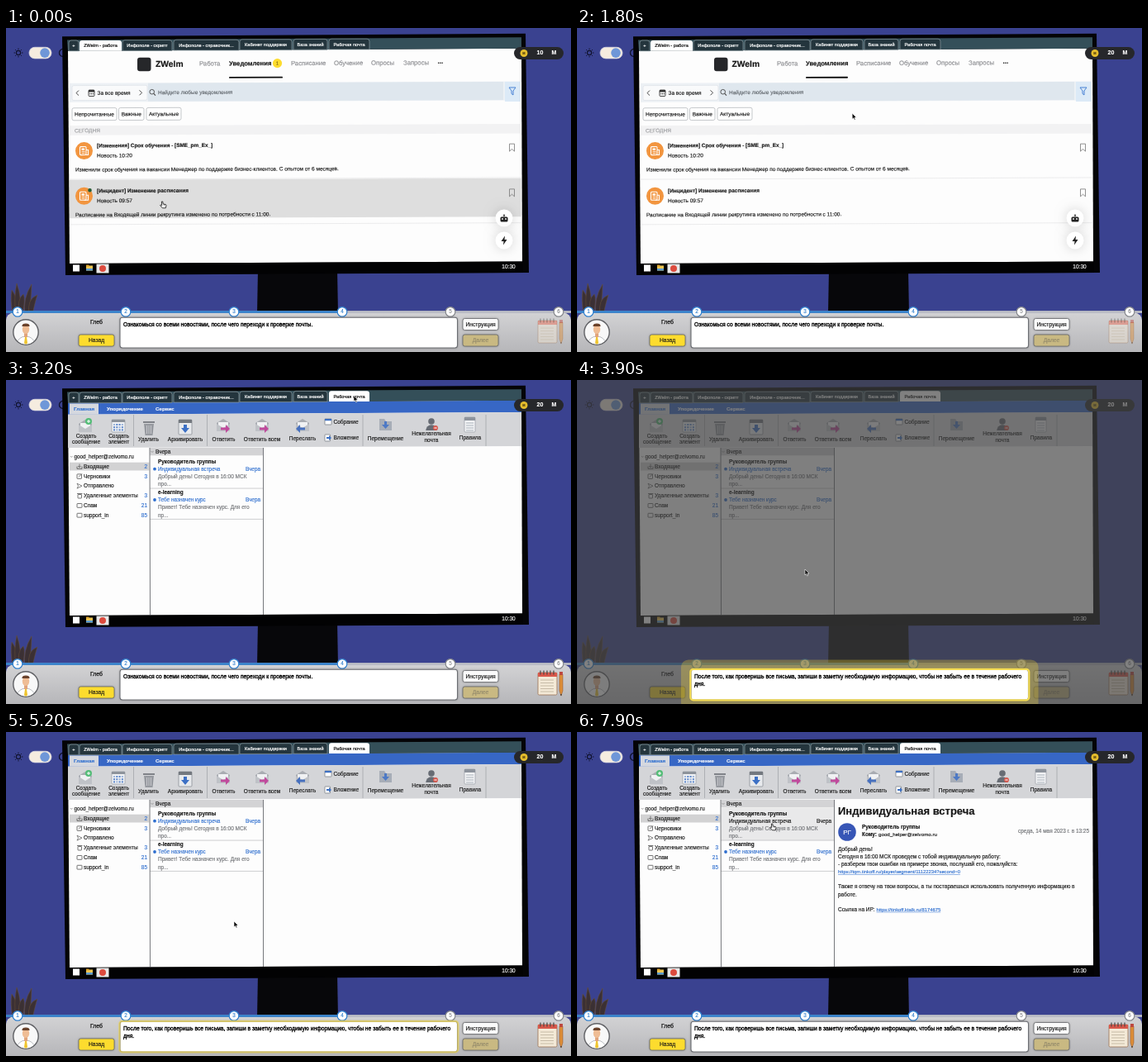
Write an HTML page with a canvas that moves like this. It is 684 px wide and 392 px high and loops after 8000 ms.

```html
<!DOCTYPE html>
<html lang="ru">
<head>
<meta charset="utf-8">
<style>
html, body { margin: 0; width: 100%; height: 100%; overflow: hidden; background: #3a4290; }
canvas { display: block; width: 684px; height: 392px; }
</style>
</head>
<body>
<canvas id="stage"></canvas>
<script>
const W = 684, H = 392, LOOP = 8000;
const canvas = document.getElementById('stage');
const ratio = window.devicePixelRatio || 1;
canvas.width = W * ratio;
canvas.height = H * ratio;
const c = canvas.getContext('2d');

const SANS = '"Liberation Sans", Arial, sans-serif';
const INK = '#161616', BLUE = '#2f6fcf', YELLOW = '#fddc2e', MUTED = '#8b8c90';
const EMAIL = 'good_helper@zelvomo.ru';
const PAGE = [[75, 27.8], [624, 24.8], [625, 282.5], [77, 285]];

const clamp = v => Math.max(0, Math.min(1, v));
const span = (t, a, b) => clamp((t - a) / (b - a));
const ease = p => p * p * (3 - 2 * p);

function rect(x, y, w, h, fill) { c.fillStyle = fill; c.fillRect(x, y, w, h); }
function box(x, y, w, h, r, fill, stroke, width = 1) {
  c.beginPath(); c.roundRect(x, y, w, h, r); paint(fill, stroke, width);
}
function disc(x, y, r, fill, stroke, width = 1) {
  c.beginPath(); c.arc(x, y, r, 0, 7); paint(fill, stroke, width);
}
function poly(points, fill, stroke, width = 1, closed = true) {
  c.beginPath();
  points.forEach(([x, y]) => c.lineTo(x, y));
  if (closed) c.closePath();
  paint(fill, stroke, width);
}
function line(x1, y1, x2, y2, color, width = 1) { poly([[x1, y1], [x2, y2]], null, color, width, false); }
function paint(fill, stroke, width) {
  if (fill) { c.fillStyle = fill; c.fill(); }
  if (stroke) { c.strokeStyle = stroke; c.lineWidth = width; c.stroke(); }
}
// heft thickens the letters a little without widening the line
function text(s, x, y, { size = 6.5, color = INK, weight = 400, align = 'left', font = SANS, heft = .15 } = {}) {
  c.font = `${weight} ${size}px ${font}`;
  c.fillStyle = c.strokeStyle = color;
  c.textAlign = align;
  c.textBaseline = 'middle';
  c.fillText(s, x, y + .5);
  if (heft) {
    c.lineWidth = heft;
    c.lineJoin = 'round';
    c.strokeText(s, x, y + .5);
    c.lineJoin = 'miter';
  }
}
const bold = (s, x, y, o = {}) => text(s, x, y, { weight: 700, ...o });
const mid = (s, x, y, o = {}) => text(s, x, y, { align: 'center', ...o });
function at(x, y, draw) { c.save(); c.translate(x, y); draw(); c.restore(); }
function alpha(a, draw) { if (a > 0) { c.save(); c.globalAlpha *= a; draw(); c.restore(); } }
function shadow(color, blur, draw) {
  c.save(); c.shadowColor = color; c.shadowBlur = blur * ratio; draw(); c.restore();
}

// Cursor: stops and quadratic moves between them
const moves = [
  { a: 450, b: 1000, from: [190, 210], via: [170, 170], to: [129, 143] },
  { a: 1480, b: 2120, from: [129, 143], via: [390, 126], to: [421, 19] },
  { a: 3250, b: 3750, from: [421, 19], via: [370, 130], to: [276, 229] },
  { a: 6750, b: 7150, from: [276, 229], via: [262, 160], to: [237, 111] }
];
function pointer(t) {
  const m = moves.filter(v => t >= v.a).pop() || moves[0];
  const p = ease(span(t, m.a, m.b)), q = 1 - p;
  return [0, 1].map(i => q * q * m.from[i] + 2 * q * p * m.via[i] + p * p * m.to[i]);
}

function drawCursor(x, y, hand) {
  at(x, y, () => {
    if (!hand) {
      poly([[0, 0], [0, 7], [1.6, 5.6], [2.7, 8], [3.9, 7.5], [2.8, 5.1], [5, 5]], '#000', '#fff', .6);
      return;
    }
    poly([[-1.6, 0], [-.2, 0], [.2, 3], [3.4, 3.5], [4, 4.6], [3.3, 7.8], [-.6, 7.8], [-3.4, 4.6], [-2.8, 3.9], [-1.3, 4.8]],
      '#fff', '#111', .8);
    line(1.2, 3.3, 1.2, 4.8, '#111', .4);
    line(2.4, 3.5, 2.4, 4.8, '#111', .4);
  });
}

function drawRoom() {
  rect(0, 0, W, H, '#3a4290');
  // plant blades: foot, tip
  for (const [foot, x, y] of [[10, 7, 317], [14, 13, 309], [18, 21, 322], [25, 31, 310], [30, 38, 323]]) {
    c.beginPath();
    c.moveTo(foot - 2, 346);
    c.quadraticCurveTo(foot - 5, 328, x, y);
    c.quadraticCurveTo(foot + 6, 328, foot + 2, 346);
    paint('#3b3034', '#6b5238', .5);
  }
  // theme switch
  disc(15, 30, 2.6, null, '#10122c', 1.1);
  for (let i = 0; i < 8; i++) {
    const u = Math.cos(i * Math.PI / 4), v = Math.sin(i * Math.PI / 4);
    line(15 + 4 * u, 30 + 4 * v, 15 + 5.4 * u, 30 + 5.4 * v, '#10122c', 1);
  }
  box(28, 23.3, 27, 13.6, 6.8, '#f5ecdf', '#d9d9e4', .8);
  disc(47, 30.1, 5.8, '#6f97d8');
  c.beginPath(); c.arc(69, 30, 4.5, .9, 5.3); paint(null, '#10122c', 1.3);

  poly([[305, 292], [401, 292], [402, 346], [304, 346]], '#07070a');
  poly([[68, 10.3], [629, 6.8], [633, 296], [72, 299]], '#040406');
}

function drawCoins(coins) {
  box(615, 23, 60, 15, 7.5, '#26272b');
  disc(627, 30.5, 4.5, '#e5bd2c');
  mid('м', 627, 30, { size: 4.5, weight: 700, color: '#574312' });
  mid(coins, 646.5, 30, { size: 7, weight: 700, color: '#fff' });
  mid('М', 663.5, 30, { size: 7, weight: 700, color: '#fff' });
}

const tabs = [
  ['+', 76, 88], ['ZWelm - работа', 89, 140], ['Инфополе - скрипт', 141, 201],
  ['Инфополе - справочник...', 203, 282], ['Кабинет поддержки', 283, 346],
  ['База знаний', 348, 389], ['Рабочая почта', 391, 440]
];
function drawBrowser(active, hovered) {
  poly([[74, 14.5], [624, 11.2], PAGE[1], PAGE[0]], '#344f59');
  tabs.forEach(([label, a, b], i) => {
    const y = 15 - (a - 76) * .0058, on = i === active, hot = i === hovered;
    box(a, y, b - a, 12.8, [3, 3, 0, 0], on ? '#fff' : hot ? '#8b979c' : '#24353d', on ? null : '#8a9a9f', .7);
    mid(label, (a + b) / 2, y + 6.3, { size: 5.6, color: on ? INK : hot ? '#4d5960' : '#fff', heft: .2 });
  });
  poly([PAGE[3], PAGE[2], [626, 296], [77, 298]], '#020203');
  rect(81, 286.5, 8, 8, '#fff');
  rect(97, 287.5, 8, 6, '#efc653');
  rect(97, 286.5, 3.5, 2, '#d69d2b');
  rect(97, 291, 8, 2.5, '#5b9bd0');
  rect(109.5, 285.5, 15, 11, '#e9e9e9');
  disc(117, 291, 4, '#dc4b3e');
  mid('10:30', 608.5, 288.7, { color: '#fff' });
}

function bookmark(x, y) {
  poly([[x - 3, y - 4.5], [x + 3, y - 4.5], [x + 3, y + 4.5], [x, y + 1.8], [x - 3, y + 4.5]], null, '#777', .8);
}
function newsIcon(x, y, unread) {
  disc(x, y, 10.5, '#f2953f');
  box(x - 5, y - 5, 7.5, 10, 1, null, '#fff', 1.1);
  poly([[x + 2.5, y - 1], [x + 5, y - 1], [x + 5, y + 5], [x, y + 5]], null, '#fff', 1.1, false);
  rect(x - 3, y - 3, 3.5, 2.4, '#fff');
  line(x - 3, y + 1, x + 1, y + 1, '#fff', .8);
  line(x - 3, y + 3, x + 1, y + 3, '#fff', .8);
  if (unread) disc(x + 7, y - 7, 2.3, '#245b35');
}
function chevron(x, y, dir) {
  poly([[x - dir * 1.5, y - 3], [x + dir * 1.5, y], [x - dir * 1.5, y + 3]], null, '#333', .9, false);
}

function drawNews(t, hoverRow) {
  poly(PAGE, '#fdfdfd');
  c.save();
  c.transform(1, -.004, 0, 1, 0, .44);
  const unread = t < 500, shift = unread ? 0 : 7;
  box(159 + shift, 36, 16.5, 16.5, 3, '#26272a');
  bold('ZWelm', unread ? 181 : 187.5, 44, { size: 10.3 });
  const nav = [['Работа', 234], ['Расписание', 345], ['Обучение', 397], ['Опросы', 442], ['Запросы', 481]];
  nav.forEach(([s, x], i) => text(s, x + (i || unread ? -shift : 8), 43.5, { size: 7.7, color: MUTED }));
  bold('Уведомления', 270 + shift, 43.5, { size: 7.7 });
  bold('...', 522.5 - shift, 42, { size: 8 });
  if (unread) {
    disc(328.5, 43.5, 5.6, YELLOW);
    mid('1', 328.5, 43.4, { size: 6, color: '#806a12' });
  }
  box(270 + shift, 59.7, unread ? 65 : 51, 1.8, .9, '#111');

  rect(77, 66.5, 546, 23, '#edf1f5');
  box(80, 69.5, 91, 18, 2, '#f9fafb', '#d8dee4', .6);
  rect(172, 67, 430, 22, '#dfe7ee');
  rect(604, 67, 19, 24, '#dceaf7');
  chevron(86.5, 78.5, -1);
  chevron(163, 78.5, 1);
  box(100, 75, 7, 7.5, 1, null, '#333', .9);
  rect(100, 75, 7, 2.4, '#333');
  for (let i = 0; i < 3; i++) rect(101.4 + i * 1.7, 79, 1, 1.2, '#333');
  text('За все время', 110.5, 78.5);
  disc(176.7, 77.5, 2.8, null, '#444', .9);
  line(178.8, 79.7, 181, 82, '#444', 1);
  text('Найдите любые уведомления', 184, 78.2, { color: '#60666c' });
  poly([[609, 74], [617, 74], [614, 78], [614, 83], [612, 81.5], [612, 78]], null, '#3978d0', .9);

  [['Непрочитанные', 80, 54], ['Важные', 136.5, 30.5], ['Актуальные', 170, 42]].forEach(([s, x, w]) => {
    box(x, 96.7, w, 15, 2, '#fff', '#aeb2b7', .7);
    mid(s, x + w / 2, 104.2);
  });
  rect(77, 118, 546, 11.5, '#f2f2f3');
  text('СЕГОДНЯ', 83, 124, { color: '#9a9b9e' });

  const rows = [
    ['[Изменения] Срок обучения - [SME_pm_Ex_]', 'Новость 10:20',
      'Изменили срок обучения на вакансии Менеджер по поддержке бизнес-клиентов. С опытом от 6 месяцев.'],
    ['[Инцидент] Изменение расписания', 'Новость 09:57',
      'Расписание на Входящей линии рекрутинга изменено по потребности с 11:00.']
  ];
  rows.forEach(([title, when, body], i) => {
    const y = 130 + i * 54.7;
    if (hoverRow === i) rect(77, y - 1, 546.5, 46.5, '#dedede');
    newsIcon(94.5, y + 18.5, unread && i === 1);
    bold(title, 110, y + 12.2, { size: 6.4 });
    text(when, 110, y + 24.2);
    text(body, 84, y + 41.2);
    bookmark(612.5, y + 16.7);
    line(77, y + 53, 623.5, y + 53, '#e4e4e6', .7);
  });
  c.restore();

  for (const y of [230, 257]) shadow('rgba(0,0,0,.16)', 14, () => disc(603, y, 10.5, '#fff'));
  box(598.5, 228.5, 9, 6, 1.5, '#222');
  line(603, 228, 603, 225.5, '#222', 1.4);
  disc(601, 231, .9, '#fff');
  disc(605, 231, .9, '#fff');
  poly([[604, 251.5], [599.5, 258], [602.5, 258], [602, 262.5], [606.5, 256], [603.5, 256]], '#222');
}

function drawModal(p) {
  alpha(p * .46, () => poly(PAGE, '#000'));
  alpha(p, () => {
    box(185, 113.5, 329.5, 70.5, 4, '#fff');
    text('Сегодня 09:57', 193, 127.7, { color: '#77787b' });
    box(238, 123, 24.5, 9, 4.5, '#d9dadd');
    mid('Новость', 250.3, 127.3, { size: 4.9 });
    box(265, 123, 22.5, 9, 4.5, '#f7b7b7');
    mid('Важно!', 276.2, 127.3, { size: 4.9 });
    text('[Инцидент] Изменение расписания', 193, 141,
      { size: 12.3, weight: 100, color: '#222', font: 'Roboto, Inter, sans-serif', heft: 0 });
    text('Расписание на Входящей линии рекрутинга изменено по потребности с 11:00.', 193, 162.4);
    text('Ознакомься со своим расписанием.', 193, 172);
    bookmark(502.5, 134);
  });
}

function envelope(x, y, mark, color) {
  poly([[x - 8, y - 3], [x, y - 8], [x + 8, y - 3], [x + 8, y + 7], [x - 8, y + 7]], '#a9acb2');
  rect(x - 6, y - 4, 12, 7, '#f0f1f3');
  poly([[x - 8, y - 2], [x, y + 3], [x + 8, y - 2], [x + 8, y + 7], [x - 8, y + 7]], '#bfc2c7');
  if (mark === '+') {
    disc(x + 4, y - 6, 4, '#55bd78');
    line(x + 2, y - 6, x + 6, y - 6, '#fff');
    line(x + 4, y - 8, x + 4, y - 4, '#fff');
  } else {
    const d = mark === '<' ? -1 : 1;
    poly([[x - d * 3, y + 2.5], [x + d * 3, y + 2.5], [x + d * 3, y - 1], [x + d * 8, y + 4], [x + d * 3, y + 9], [x + d * 3, y + 5.5], [x - d * 3, y + 5.5]], color);
  }
}

function drawRibbon() {
  poly([PAGE[0], PAGE[1], [624, 39], [75, 41.7]], '#3767c5');
  rect(77, 28.5, 35, 13.2, '#d5d8df');
  bold('Главная', 82, 35.2, { size: 6.2, color: BLUE });
  bold('Упорядочение', 122, 35, { size: 6.2, color: '#fff' });
  bold('Сервис', 181, 34.7, { size: 6.2, color: '#fff' });
  poly([[75, 41.7], [624, 39], [624, 80], [75, 82]], '#d4d5d8');
  [154.5, 243.5, 432, 581].forEach(x => line(x, 42, x, 80, '#a4a6ab', .8));

  [['Создать', 97, 68], ['сообщение', 97, 75.2], ['Создать', 136.5, 68], ['элемент', 136.5, 75.2],
   ['Удалить', 172.5, 72], ['Архивировать', 217, 72], ['Ответить', 263.5, 71.3], ['Ответить всем', 310, 71.3],
   ['Переслать', 359, 71], ['Перемещение', 459.5, 70.3], ['Нежелательная', 515, 65], ['почта', 515, 72.3],
   ['Правила', 562, 70]].forEach(([s, x, y]) => mid(s, x, y));
  text('Собрание', 396.5, 50.7);
  text('Вложение', 396.5, 70.2);

  envelope(96, 56, '+');
  box(128, 48, 16, 15, 1, '#eff1f4', '#9a9fa6', .7);
  rect(128, 48, 16, 3, '#8d939b');
  for (let i = 0; i < 12; i++) rect(130 + i % 4 * 3.3, 53 + (i >> 2) * 3.2, 2, 2, i % 3 ? '#5e88ca' : '#9db4d8');
  poly([[167, 53], [179, 53], [177.5, 67], [168.5, 67]], '#96999f');
  rect(166, 50, 14, 2, '#7f8288');
  [170.5, 173, 175.5].forEach(x => line(x, 55, x, 65, '#d4d5d8', .8));
  box(209, 48, 16, 18, 1, '#e8eaed', '#8b9097', .8);
  rect(209, 48, 16, 4, '#73787f');
  poly([[215, 54], [219, 54], [219, 58], [222, 58], [217, 64], [212, 58], [215, 58]], '#3c70c5');
  envelope(263, 55, '>', '#c04a9c');
  envelope(310, 55, '>', '#c04a9c');
  envelope(359, 55, '<', '#4770be');
  box(386, 47, 8, 7, .5, '#fff', '#6c7179', .7);
  rect(386, 47, 8, 2.2, '#3d70c3');
  box(386, 66, 6.5, 8, .5, '#fff', '#6c7179', .7);
  poly([[388, 69], [391, 69], [391, 67], [394, 70], [391, 73], [391, 71], [388, 71]], '#3d70c3');
  poly([[452, 47], [458, 47], [460, 50], [467, 50], [467, 61], [452, 61]], '#a7adb7');
  poly([[458, 50], [461, 50], [461, 54], [464, 54], [459.5, 59], [455, 54], [458, 54]], '#4d79c5');
  disc(515, 50, 3.8, '#676c74');
  c.beginPath(); c.arc(515, 61, 6.8, Math.PI, 0); paint('#676c74');
  disc(520, 58, 3, '#d65a50');
  line(518.4, 58, 521.6, 58, '#fff');
  box(555, 45, 13, 18, 1, '#f1f2f4', '#9a9fa6', .7);
  rect(555, 45, 13, 4, '#8e949d');
  for (let y = 52; y < 62; y += 3) line(557, y, 566, y, '#9ba2ac', .8);
}

function drawLetter() {
  bold('Индивидуальная встреча', 316, 96, { size: 13 });
  disc(327, 121, 10.8, '#3756b6');
  mid('РГ', 327, 121, { size: 8, color: '#fff' });
  bold('Руководитель группы', 345, 114.8, { size: 6.4 });
  bold('Кому:', 345, 123.5, { size: 6.4 });
  text(EMAIL, 365, 123.5, { size: 6.2 });
  text('среда, 14 мая 2023 г. в 13:25', 620, 120, { size: 6.45, color: '#6d6f73', align: 'right' });
  [['Добрый день!', 141.7], ['Сегодня в 16:00 МСК проведем с тобой индивидуальную работу:', 150.3],
   ['- разберем твои ошибки на примере звонка, послушай его, пожалуйста:', 159.5],
   ['Также я отвечу на твои вопросы, а ты постараешься использовать полученную информацию в', 187],
   ['работе.', 196.3], ['Ссылка на ИР:', 214.5]].forEach(([s, y]) => text(s, 316, y));
  [['https://tqm.tinkoff.ru/player/segment/11122234?second=0', 316, 169],
   ['https://tinkoff.ktalk.ru/8174675', 362.5, 214.5]].forEach(([s, x, y]) => {
    text(s, x, y, { size: 5.83, color: BLUE });
    line(x, y + 3.5, x + c.measureText(s).width, y + 3.5, BLUE, .5);
  });
}

function drawMail(hover, opened) {
  poly(PAGE, '#fdfdfd');
  drawRibbon();
  poly([[78, 92], [79.3, 93.5], [80.6, 92]], null, '#777', .6, false);
  text(EMAIL, 82.5, 92.5, { size: 6.3 });
  rect(77, 99.7, 96.5, 9.8, '#d2d2d3');
  [['Входящие', 2], ['Черновики', 3], ['Отправлено', ''], ['Удаленные элементы', 3], ['Спам', 21], ['support_in', 85]]
    .forEach(([s, n], i) => {
      const y = 104.6 + i * 11.8;
      text(s, 94, y);
      text(n, 171, y, { color: BLUE, align: 'right' });
      if (i === 0) poly([[86, y], [86, y + 2.8], [92, y + 2.8], [92, y]], null, '#555', .8, false);
      if (i === 0) poly([[89, y - 3], [89, y + 1], [87.5, y - .5], [89, y + 1], [90.5, y - .5]], null, '#555', .7, false);
      if (i === 1) { box(86, y - 2.5, 5.5, 5.5, .5, null, '#555', .8); line(88, y + 1, 92, y - 3, '#555', .8); }
      if (i === 2) poly([[86, y - 3], [92, y], [86, y + 3], [87.5, y]], null, '#555', .7);
      if (i === 3) { box(87, y - 1.5, 4.5, 4.5, .5, null, '#555', .8); line(86, y - 2.5, 92.5, y - 2.5, '#555', .8); }
      if (i > 3) box(86, y - 2.3, 6, 4.8, .5, null, '#555', .8);
    });

  rect(174, 82, 137.5, 9.3, '#d3d3d5');
  poly([[175.5, 86], [177, 87.5], [178.5, 86]], null, '#777', .6, false);
  text('Вчера', 181, 87);
  if (hover || opened) rect(174.5, 91.5, 136.5, 39.5, '#e9e9ea');
  [['Руководитель группы', 'Индивидуальная встреча', 'Добрый день! Сегодня в 16:00 МСК', 'про...'],
   ['e-learning', 'Тебе назначен курс', 'Привет! Тебе назначен курс. Для его', 'пр...']].forEach((row, i) => {
    const y = 98.9 + i * 37.3, read = opened && !i, color = read ? INK : BLUE;
    bold(row[0], 184, y, { size: 6.4 });
    text(row[1], 184, y + 8.8, { size: 6.4, color });
    text('Вчера', 308, y + 8.8, { size: 6.4, color, align: 'right' });
    if (!read) disc(180, y + 8.8, 1.9, BLUE);
    text(row[2], 184, y + 18, { color: '#737579' });
    text(row[3], 184, y + 27.2, { color: '#737579' });
    line(174, y + 32.2, 311, y + 32.2, '#b9babd', .7);
  });
  line(174, 82, 174.5, 284.5, '#77797d', 1);
  line(311.5, 82, 311.5, 284, '#77797d', 1);
  if (opened) drawLetter();
}

function button(label, x, y, fill, color = INK) {
  shadow('rgba(0,0,0,.45)', 2.5, () => box(x, y, 43, 14, 2.5, fill));
  box(x, y, 43, 14, 2.5, null, '#66676b', .8);
  mid(label, x + 21.5, y + 7, { size: 6.7, color });
}

function drawNotepad(active) {
  alpha(active ? 1 : .45, () => {
    box(644, 354, 23, 27, 1.5, '#f3e9d7', '#9b7254', .8);
    rect(644, 354, 23, 5, '#d9584b');
    for (let x = 647; x < 667; x += 4) line(x, 351.5, x, 356.5, '#4c4745', 1.2);
    for (let y = 363; y < 380; y += 3.5) line(647, y, 663, y, '#b4a691', .7);
    poly([[670, 356], [674, 356], [674, 376], [672, 382], [670, 376]], '#dd8e38', '#9a5a2a', .6);
    rect(670, 353, 4, 4, '#bc4840');
    poly([[671.2, 380], [672.8, 380], [672, 382.5]], '#333');
  });
}

function drawPanel(noteActive) {
  const g = c.createLinearGradient(0, 345, 0, H);
  g.addColorStop(0, '#d2d2d4');
  g.addColorStop(1, '#b6b6b9');
  box(0, 344.5, W, 60, [9, 9, 0, 0], g);
  rect(0, 342.2, W, 2.6, '#c2c4c8');
  rect(0, 342.2, 407, 2.6, '#2f7fcd');
  for (let i = 0; i < 6; i++) {
    const x = 14 + i * 131, color = i < 4 ? '#2f7fcd' : '#85878c';
    disc(x, 343.4, 5.8, '#fff', color, 1.2);
    mid(i + 1, x, 343.2, { size: 6.3, color });
  }
  disc(24, 368, 15.2, '#f8f8f8', '#5f6064', 1.4);
  c.save();
  c.beginPath(); c.arc(24, 368, 14.5, 0, 7); c.clip();
  c.beginPath(); c.ellipse(24, 382, 10.5, 9, 0, 0, 7); paint('#fff', '#a9adb3', .8);
  rect(22, 368, 4, 6, '#e0a47c');
  c.beginPath(); c.ellipse(24, 364.5, 4.2, 5.6, 0, 0, 7); paint('#efbd95');
  c.beginPath(); c.ellipse(24, 361, 4.6, 3.4, 0, Math.PI, 0); paint('#6b432c');
  poly([[23, 374], [25, 374], [26, 381], [24, 384], [22, 381]], '#efc52e');
  c.restore();
  mid('Глеб', 109.5, 356, { size: 6.9, heft: .25 });
  button('Назад', 88, 371, YELLOW);
  button('Инструкция', 553, 351.5, '#fafafa');
  button('Далее', 553, 371, '#c9b982', '#92896b');
  drawNotepad(noteActive);
}

function drawTask(t) {
  shadow('rgba(0,0,0,.4)', 3, () => box(138, 350.3, 408.5, 36.7, 3, '#fff'));
  box(138, 350.3, 408.5, 36.7, 3, null, '#6c6e73', 1.1);
  const lines = t < 3300
    ? ['Ознакомься со всеми новостями, после чего переходи к проверке почты.']
    : ['После того, как проверишь все письма, запиши в заметку необходимую информацию, чтобы не забыть ее в течение рабочего', 'дня.'];
  lines.forEach((s, i) => text(s, 142, 358.4 + i * 9.3, { size: 6.74, color: '#000', heft: .32 }));
}

function drawSpotlight(t) {
  alpha(span(t, 3400, 3800) * (1 - span(t, 5080, 5190)) * .67, () => rect(0, 0, W, H, '#424242'));
  if (t >= 3500 && t < 4600) {
    const grow = 12 * (t - 3500) / 400;
    alpha(.27 * (1 - span(t, 3900, 4600)), () =>
      box(138 - grow, 350.5 - grow, 408.5 + 2 * grow, 36.5 + 2 * grow, 3 + grow * .5, YELLOW));
  }
  drawTask(t);
  alpha(span(t, 3450, 3700) * (1 - span(t, 5100, 5400)), () =>
    box(137.3, 349.8, 410, 37.5, 3.5, null, '#f4dc55', 2.2));
}

function render(t) {
  const [x, y] = pointer(t);
  const mail = t >= 3200;
  const modal = span(t, 120, 340) * (1 - span(t, 1270, 1450));
  const mailHover = mail && y < 131 && y > 91 && x < 311 && t > 6800;
  const row = modal || mail || x > 624 ? -1 : y > 130 && y < 182 ? 0 : y >= 183 && y < 232 ? 1 : -1;
  const tabHover = !mail && y < 28;

  c.setTransform(ratio, 0, 0, ratio, 0, 0);
  drawRoom();
  if (mail) drawMail(mailHover, t >= 7350);
  else {
    drawNews(t, row);
    drawModal(modal);
  }
  drawBrowser(mail ? 6 : 1, tabHover ? 6 : -1);
  drawCoins(t < 500 ? '10' : '20');
  drawPanel(mail);
  drawSpotlight(t);
  if (t > 5900) {
    alpha(.5 - .5 * Math.cos((t - 5900) * Math.PI / 500), () =>
      box(642.5, 350, 34, 36, 1, 'rgba(230,60,55,.2)', '#e04a44', 1.5));
  }
  drawCursor(x, y, row >= 0 || mailHover);
}

const start = performance.now();
function frame() {
  render((performance.now() - start) % LOOP);
  requestAnimationFrame(frame);
}
frame();
</script>
</body>
</html>
```
